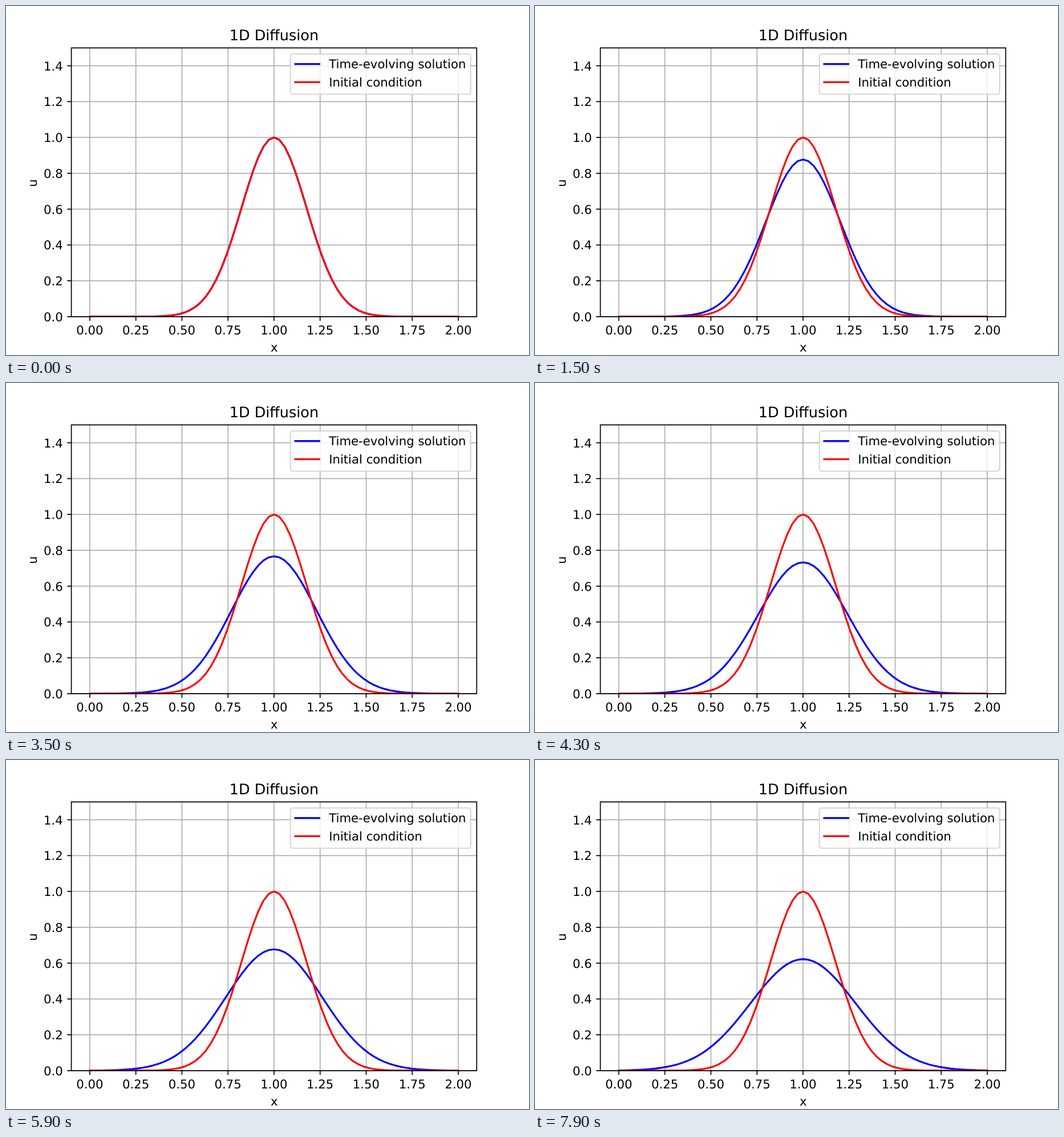
These frames come from a looping animation (917 px wide and 611 px high, 8 s). An HTML page:

```html
<!DOCTYPE html>
<html lang="en">
<head>
<meta charset="utf-8">
<title>1D Diffusion</title>
<style>
  html, body { margin: 0; width: 100%; height: 100%; overflow: hidden; background: #fff; }
  svg { display: block; }
  text { font: 21.22px "DejaVu Sans", sans-serif; text-rendering: geometricPrecision; }
  .title { font-size: 25.47px; }
  .mid { text-anchor: middle; }
  .end { text-anchor: end; }
  path { fill: none; }
  .grid { stroke: #b0b0b0; stroke-width: 1.7; }
  .axis { stroke: #000; stroke-width: 1.7; }
  .line { stroke-width: 3.18; stroke-linecap: square; stroke-linejoin: round; }
  .blue { stroke: #00f; }
  .red { stroke: #f00; }
  .box { fill: #fff; stroke: #ccc; stroke-width: 2.12; opacity: .8; }
</style>
</head>
<body>
<svg width="917" height="611" viewBox="0 0 917 611">
  <clipPath id="plot"><rect x="114.6" y="73.3" width="710.7" height="470.5"/></clipPath>
  <path id="grid" class="grid"/>
  <g clip-path="url(#plot)">
    <path id="now" class="line blue"/>
    <path id="start" class="line red"/>
  </g>
  <path id="ticks" class="axis"/>
  <path class="axis" d="M114.6 73.3H825.3V543.8H114.6Z"/>
  <g id="labels"></g>
  <text class="mid title" x="469.9" y="60.3">1D Diffusion</text>
  <text class="mid" x="470.3" y="605">x</text>
  <text class="mid" transform="translate(53.5 310) rotate(-90)">u</text>
  <rect class="box" x="498.7" y="84" width="316" height="70.5" rx="4.2"/>
  <path class="line blue" d="M507 101.6H549.4"/>
  <path class="line red" d="M507 133.4H549.4"/>
  <text x="566.2" y="109">Time-evolving solution</text>
  <text x="566.2" y="140.8">Initial condition</text>
</svg>
<script>
  const LOOP = 8000, STEP = 100, CELLS = 70;
  const SPREAD = 0.02005; // relative growth of the squared width per step
  const $ = id => document.getElementById(id);
  const px = x => 146.93 + 323.04 * x;
  const py = u => 543.8 - 313.65 * u;

  // Gaussian pulse after n diffusion steps
  function curve(n) {
    const s = 1 + SPREAD * n;
    const points = Array.from({ length: CELLS + 1 }, (_, i) => {
      const x = 2 * i / CELLS;
      const u = Math.exp(-16 * (x - 1) ** 2 / s) / Math.sqrt(s);
      return px(x).toFixed(2) + ' ' + py(u).toFixed(2);
    });
    return 'M' + points.join('L');
  }

  let grid = '', ticks = '', labels = '';
  for (let i = 0; i <= 8; i++) {
    const x = px(i / 4);
    grid += `M${x} 73.3V543.8`;
    ticks += `M${x} 543.8v7.4`;
    labels += `<text class="mid" x="${x}" y="574.8">${(i / 4).toFixed(2)}</text>`;
  }
  for (let i = 0; i <= 7; i++) {
    const y = py(i / 5);
    grid += `M114.6 ${y}H825.3`;
    ticks += `M114.6 ${y}h-7.4`;
    labels += `<text class="end" x="99.8" y="${y + 8}">${(i / 5).toFixed(1)}</text>`;
  }
  $('grid').setAttribute('d', grid);
  $('ticks').setAttribute('d', ticks);
  $('labels').innerHTML = labels;
  $('start').setAttribute('d', curve(0));

  function draw() {
    const n = Math.floor(performance.now() % LOOP / STEP);
    $('now').setAttribute('d', curve(n));
    requestAnimationFrame(draw);
  }
  draw();
</script>
</body>
</html>
```
